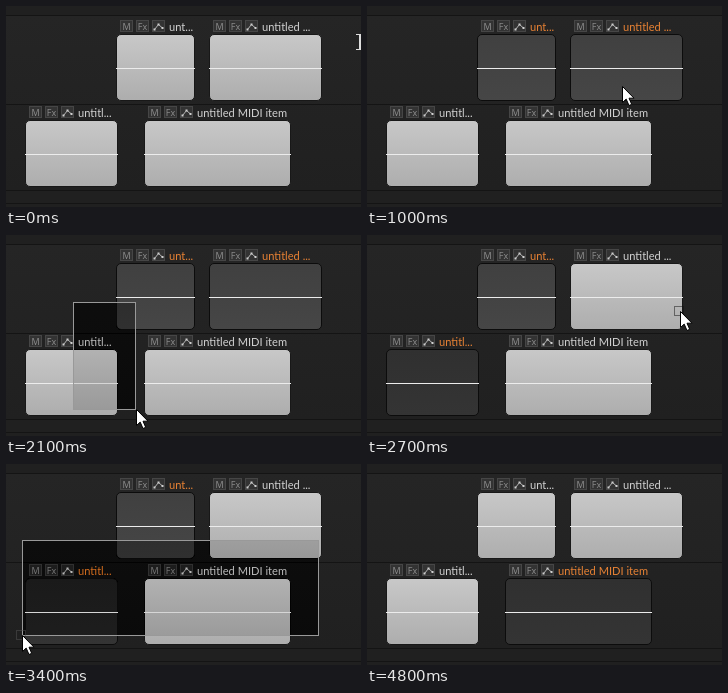
An HTML page with a canvas that plays this animation: 355x201 px, repeating every 5.3 s.

```html
<!DOCTYPE html>
<html lang="en">
<head>
<meta charset="utf-8">
<title>Marquee selection</title>
<style>
html, body { margin: 0; width: 100%; height: 100%; overflow: hidden; background: #222; }
canvas { display: block; width: 355px; height: 201px; }
</style>
</head>
<body>
<canvas id="stage" width="355" height="201"></canvas>
<script>
const ctx = document.getElementById('stage').getContext('2d');
const LOOP = 5300, STEP = 100, ITEM_H = 67;

const items = [
  { x: 110, y: 28, w: 79, text: 'unt...' },
  { x: 203, y: 28, w: 113, text: 'untitled ...' },
  { x: 19, y: 114, w: 93, text: 'untitl...' },
  { x: 138, y: 114, w: 147, text: 'untitled MIDI item' }
];

// Each drag runs from a to b, then waits there until released
const drags = [
  { start: 5, arrive: 10, release: 10, a: { x: 128, y: 54 }, b: { x: 255, y: 80 } },
  { start: 15, arrive: 21, release: 22, a: { x: 67, y: 67 }, b: { x: 130, y: 174 } },
  { start: 27, arrive: 29, release: 35, a: { x: 313, y: 76 }, b: { x: 16, y: 171 }, dots: true },
  { start: 39, arrive: 43, release: 44, a: { x: 141, y: 124 }, b: { x: 233, y: 181 }, fade: true }
];
const enter = { x: 354, y: 36 }, leave = { x: 340, y: 215 }, GONE = 48;

const clamp = k => Math.max(0, Math.min(1, k));
const smooth = k => k * k * (3 - 2 * k);
const settle = k => 1 - (1 - k) ** 4;

function between(a, b, k) {
  return { x: Math.round(a.x + (b.x - a.x) * k), y: Math.round(a.y + (b.y - a.y) * k) };
}

function pointerAt(n) {
  let from = enter, left = 0;
  for (const d of drags) {
    if (n < d.start) return between(from, d.a, settle((n - left) / (d.start - left)));
    if (n < d.release) return between(d.a, d.b, smooth(clamp((n - d.start) / (d.arrive - d.start))));
    from = d.b;
    left = d.release;
  }
  return between(from, leave, smooth(clamp((n - left) / (GONE - left))));
}

function bounds(a, b) {
  return [Math.min(a.x, b.x), Math.min(a.y, b.y), Math.abs(a.x - b.x), Math.abs(a.y - b.y)];
}

// The last released marquee decides what is selected
function isPicked(item, n) {
  const d = drags.findLast(d => n >= d.release);
  if (!d) return false;
  const [x, y, w, h] = bounds(d.a, d.b);
  return x < item.x + item.w && x + w > item.x && y < item.y + ITEM_H && y + h > item.y;
}

function rect(x, y, w, h, color) {
  ctx.fillStyle = color;
  ctx.fillRect(x, y, w, h);
}

function poly(points, dx = 0, dy = 0) {
  ctx.beginPath();
  points.forEach(([x, y]) => ctx.lineTo(x + dx, y + dy));
}

function vertical(y, h, top, bottom) {
  const g = ctx.createLinearGradient(0, y, 0, y + h);
  g.addColorStop(0, top);
  g.addColorStop(1, bottom);
  return g;
}

function drawTracks() {
  rect(0, 0, 355, 201, '#202020');
  rect(0, 10, 355, 174, vertical(10, 174, '#252525', '#202020'));
  for (const y of [9, 98, 184, 197]) rect(0, y, 355, 1, '#141414');
}

function drawItem({ x, y, w }, on) {
  const [top, bottom] = !on ? ['#c8c8c8', '#adadad']
    : y < 100 ? ['#404040', '#464646'] : ['#303030', '#343434'];
  ctx.beginPath();
  ctx.roundRect(x + .5, y + .5, w - 1, ITEM_H - 1, 4.5);
  ctx.fillStyle = vertical(y, ITEM_H, top, bottom);
  ctx.fill();
  ctx.strokeStyle = on ? '#0c0c0c' : '#181818';
  ctx.stroke();
  rect(x, y + 34, w, 1, '#ececec');
}

function drawButton(x, y, label) {
  rect(x, y, 13, 12, '#333');
  ctx.strokeStyle = '#464646';
  ctx.strokeRect(x + .5, y + .5, 12, 11);
  if (label) {
    ctx.font = '9px "Open Sans", sans-serif';
    ctx.textAlign = 'center';
    ctx.fillStyle = '#909090';
    ctx.fillText(label, x + 6.5, y + 9.5);
    return;
  }
  const dots = [[2.5, 9.5], [6.5, 4.5], [10.5, 8]];
  poly(dots, x, y);
  ctx.strokeStyle = '#b5b5b5';
  ctx.stroke();
  for (const [dx, dy] of dots) rect(x + dx - 1, y + dy - 1, 2, 2, '#d0d0d0');
}

function drawHeader({ x, y, text }, on) {
  ['M', 'Fx', ''].forEach((s, i) => drawButton(x + 4 + i * 16, y - 14, s));
  ctx.font = '11.1px Lato, sans-serif';
  ctx.textAlign = 'left';
  ctx.fillStyle = on ? '#e88234' : '#d2d2d2';
  ctx.fillText(text, x + 53, y - 3);
}

function drawMarquee(a, b) {
  const [x, y, w, h] = bounds(a, b);
  ctx.save();
  ctx.globalCompositeOperation = 'difference';
  rect(x, y, w, h, '#161616');
  ctx.restore();
  ctx.strokeStyle = '#999';
  ctx.strokeRect(x + .5, y + .5, w - 1, h);
}

function drawArrow({ x, y }) {
  poly([[0, 0], [0, 16], [3.7, 12.6], [6.5, 19], [9.2, 17.8], [6.5, 11.7], [11.5, 11.7]], x + .5, y + .5);
  ctx.closePath();
  ctx.fillStyle = '#fff';
  ctx.fill();
  ctx.strokeStyle = '#000';
  ctx.stroke();
}

function drawDots({ x, y }, color) {
  ctx.save();
  ctx.setLineDash([1, 1]);
  ctx.strokeStyle = color;
  ctx.strokeRect(x - 5.5, y - 4.5, 9, 9);
  ctx.restore();
}

function drawBeam({ x, y }) {
  for (const dy of [-8, 7]) rect(x - 4, y + dy, 9, 1, '#ddd');
  rect(x - 1, y - 8, 2, 16, '#ddd');
}

function drawFade({ x, y }) {
  ctx.save();
  ctx.translate(x + .5, y + .5);
  for (const [color, width] of [['#000', 3.5], ['#fff', 1.3]]) {
    ctx.strokeStyle = color;
    ctx.lineWidth = width;
    ctx.beginPath();
    for (const s of [-1, 1]) {
      ctx.moveTo(s * 6, 0);
      ctx.lineTo(s * 12, 0);
      ctx.moveTo(s * 9, -3);
      ctx.lineTo(s * 12, 0);
      ctx.lineTo(s * 9, 3);
    }
    ctx.moveTo(-5, 5);
    ctx.quadraticCurveTo(-5, -4, 5, -4);
    ctx.stroke();
  }
  ctx.restore();
}

function drawPointer(n, p, drag) {
  if (n === 0) return drawBeam(p);
  if (drag?.fade && n === drag.start) return drawFade(p);
  if (drag?.dots) drawDots(p, n === drag.start ? '#111' : '#555');
  drawArrow(p);
}

function render(time) {
  const n = Math.floor((time % LOOP) / STEP);
  const p = pointerAt(n);
  const drag = drags.find(d => n >= d.start && n < d.release);
  ctx.lineWidth = 1;
  drawTracks();
  for (const item of items) {
    const on = isPicked(item, n);
    drawItem(item, on);
    drawHeader(item, on);
  }
  if (drag && n > drag.start) drawMarquee(drag.a, p);
  if (n < GONE) drawPointer(n, p, drag);
}

const begin = performance.now();
function tick() {
  render(performance.now() - begin);
  requestAnimationFrame(tick);
}
tick();
</script>
</body>
</html>
```
